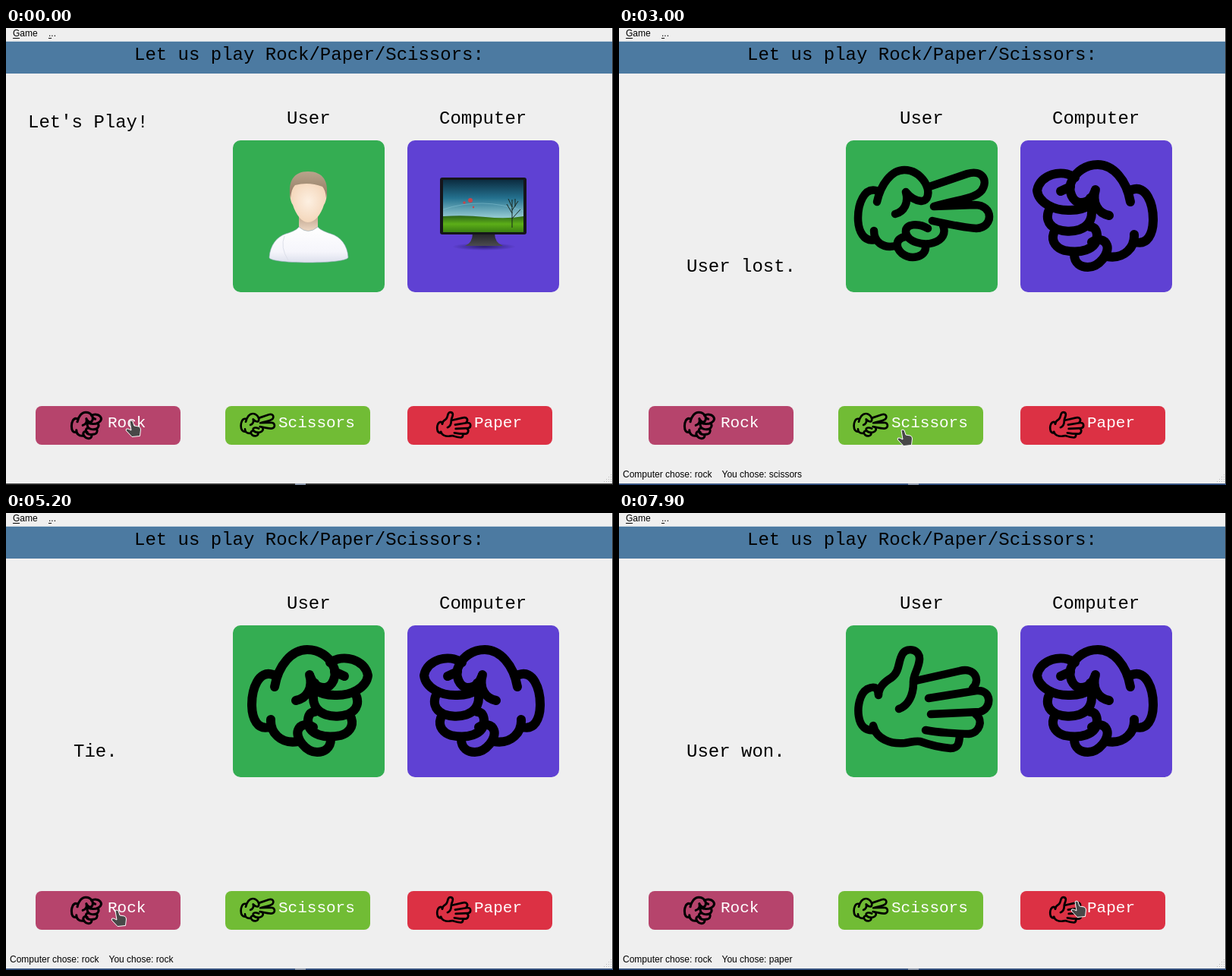
An HTML page that plays this animation: 800x602 px, repeating every 8000 ms.

```html
<!DOCTYPE html>
<html lang="en">
<head>
<meta charset="utf-8">
<title>Rock Paper Scissors</title>
<style>
  html, body { margin: 0; width: 100%; height: 100%; overflow: hidden; background: #efefef; }
  svg { display: block; width: 800px; height: 602px; }
  text { white-space: pre; }
  .mono { font: 24px "Liberation Mono", monospace; }
  .label { font-size: 21px; fill: #fff; }
  .ui { font: 12px "Liberation Sans", sans-serif; }
  .hand { fill: none; stroke: #000; stroke-width: 10.5; stroke-linecap: round; stroke-linejoin: round; }
  #rock { stroke-width: 12; }
</style>
</head>
<body>
<svg viewBox="0 0 800 602">
  <defs>
    <g id="rock" class="hand">
      <path d="M55 81C60 52 78 32 98 32C115 32 126 42 131 51C140 66 130 83 120 82C108 82 104 73 101 65C106 82 98 96 83 99"/>
      <path d="M53 65C34 58 25 84 25 104C25 124 33 138 48 134M50 124C49 140 62 157 86 153"/>
      <path d="M128 49C146 37 174 45 178 66C176 82 156 93 134 92C120 92 112 88 106 84M134 61L147 67M108 76L112 86"/>
      <path d="M160 88C168 100 164 112 152 117C136 123 104 121 106 92"/>
      <path d="M156 122C160 134 152 142 142 145C124 149 98 146 99 124C100 117 103 114 108 114"/>
      <path d="M129 150C129 162 120 167 111 167C96 167 82 148 86 138C89 130 98 129 106 134"/>
    </g>
    <g id="scissors" class="hand">
      <path d="M41 81C46 58 60 39 77 39C90 39 98 46 104 55C112 68 108 81 99 80C90 79 83 73 79 68C83 82 77 94 65 97"/>
      <path d="M40 66C24 62 16 84 16 102C16 120 24 134 38 131M37 119C37 133 48 143 66 139"/>
      <path d="M110 61L160 44C180 38 188 53 179 66C170 77 150 77 116 87L170 85C195 85 195 115 172 116C156 115 132 110 114 106"/>
      <path d="M108 116C96 109 78 109 79 121C81 134 102 139 115 135C128 131 132 122 128 112"/>
      <path d="M78 127C64 130 66 142 74 149C86 158 106 154 105 140"/>
    </g>
    <g id="paper" class="hand">
      <path d="M43 92C42 80 36 80 28 84C18 90 15 108 17 120C19 134 27 139 37 138"/>
      <path d="M36 132C40 150 60 157 78 155C90 153 92 152 98 153C112 158 126 161 138 162C150 162 149 152 150 146"/>
      <path d="M43 91C44 80 52 74 60 69C72 60 68 48 75 37C82 28 98 32 97 45C96 58 88 66 89 76C89 92 82 106 70 110"/>
      <path d="M92 73L150 60C170 55 178 72 167 83M109 96L172 86C193 84 193 110 176 114L112 117"/>
      <path d="M171 117C182 125 176 142 162 143C150 143 120 141 105 138"/>
    </g>

    <g id="person">
      <path fill="url(#neck)" d="M87 96H112V121H87Z"/>
      <path fill="url(#shirt)" stroke="#8fa9b8" stroke-width=".6" d="M48 154C49 138 58 127 70 123C80 120 85 117 87 114Q99 125 112 114C114 117 120 120 129 123C142 127 151 138 152 154C152 158 130 161 100 161C68 161 47 158 48 154Z"/>
      <path fill="none" stroke="#dcdfe9" d="M68 126Q62 141 73 158"/>
      <path fill="url(#skin)" d="M77 60C74 66 75 80 79 85C83 98 91 108 99 108C108 108 116 98 120 85C124 80 125 66 122 60Q100 46 77 60Z"/>
      <path fill="url(#hair)" d="M76 76C72 54 80 41 99 41C119 41 127 54 123 76Q122 65 118 61Q100 54 82 59Q77 64 76 76Z"/>
    </g>

    <g id="monitor">
      <ellipse cx="101" cy="140" rx="42" ry="5" fill="url(#shadow)"/>
      <path fill="url(#stand)" d="M86 122H115Q115 135 126 139H76Q86 135 86 122Z"/>
      <rect x="43" y="49" width="114" height="75" rx="3" fill="#15151a"/>
      <rect x="47" y="52" width="106" height="69" fill="url(#sky)"/>
      <path fill="none" stroke="#8cc8d5" stroke-opacity=".5" d="M47 91Q98 74 153 93"/>
      <path fill="url(#grass)" d="M47 100Q75 98 103 101T153 100V121H47Z"/>
      <path fill="none" stroke="#17251c" d="M138 115V78M138 96L131 84M138 92L146 80M138 103L149 91M138 88L133 77M142 87V77"/>
      <g fill="#c9454a"><circle cx="75" cy="82" r="1.8"/><circle cx="83" cy="79" r="3"/><circle cx="87" cy="88" r="1.2"/></g>
    </g>

    <linearGradient id="shirt" x2="0" y2="1"><stop stop-color="#fff"/><stop offset=".7" stop-color="#f5f5fb"/><stop offset="1" stop-color="#dcdfec"/></linearGradient>
    <linearGradient id="neck" x2="0" y2="1"><stop stop-color="#b99d86"/><stop offset="1" stop-color="#f1dcc8"/></linearGradient>
    <radialGradient id="skin"><stop stop-color="#fdf0e2"/><stop offset="1" stop-color="#f4d7bb"/></radialGradient>
    <linearGradient id="hair" x2="0" y2="1"><stop stop-color="#b9a48c"/><stop offset="1" stop-color="#8f7860"/></linearGradient>
    <linearGradient id="sky" x2="0" y2="1"><stop stop-color="#0c2c40"/><stop offset=".35" stop-color="#24718f"/><stop offset=".7" stop-color="#8fc6cf"/></linearGradient>
    <linearGradient id="grass" x2="0" y2="1"><stop stop-color="#2c641a"/><stop offset=".5" stop-color="#5cae18"/><stop offset="1" stop-color="#3a7d12"/></linearGradient>
    <linearGradient id="stand" x2="0" y2="1"><stop stop-color="#222226"/><stop offset="1" stop-color="#4b4b50"/></linearGradient>
    <radialGradient id="shadow"><stop stop-color="#2b1d70"/><stop offset="1" stop-color="#5f41d3"/></radialGradient>
  </defs>

  <rect width="800" height="602" fill="#efefef"/>
  <g class="ui">
    <text x="9" y="11">Game</text>
    <text x="56" y="11">...</text>
    <path stroke="#000" d="M9 13.5h9M56 13.5h4"/>
  </g>
  <rect y="17" width="800" height="1" fill="#d3dde5"/>
  <rect y="18" width="800" height="42" fill="#4c7aa1"/>

  <g class="mono">
    <text x="169" y="42">Let us play Rock/Paper/Scissors:</text>
    <text x="370" y="126">User</text>
    <text x="571" y="126">Computer</text>
    <text id="result"></text>
  </g>

  <rect x="299" y="148" width="200" height="200" rx="10" fill="#34ad52"/>
  <rect x="529" y="148" width="200" height="200" rx="10" fill="#5f41d3"/>
  <use id="user"/>
  <use id="computer"/>

  <g id="buttons"></g>
  <text id="status" class="ui" x="5" y="592"></text>

  <path stroke="#bbb" stroke-dasharray="1 2" d="M797 588.5h2M794 591.5h5M791 594.5h8M788 597.5h11"/>
  <path stroke="#333" d="M799.5 0V602"/>
  <rect id="edge" y="600" width="800" height="2"/>
  <rect x="381" y="600" width="14" height="2" fill="#8894a8"/>
  <path id="cursor" fill="#484848" stroke="#fff" stroke-linejoin="round"
    d="M6 2Q8 0 10 2L12 8L18 9Q20.500 10 20.500 13L19.500 21.500L9 22.500L1 14Q1 11 4 12L8 14Z"/>
</svg>

<script>
const LOOP = 8000;
const byId = id => document.getElementById(id);

// [name, button x, colour, icon x, label x]
const buttons = [
  ['Rock', 39, '#b6446c', 80, 134],
  ['Scissors', 289, '#71bc35', 305.5, 359],
  ['Paper', 529, '#dc3144', 564, 617],
];
byId('buttons').innerHTML = buttons.map(([name, x, color, iconX, textX]) => `
  <rect x="${x}" y="498" width="191" height="51" rx="8" fill="${color}"/>
  <use href="#${name.toLowerCase()}" transform="translate(${iconX} 498) scale(.256)"/>
  <text class="mono label" x="${textX}" y="526">${name}</text>`).join('');

// [time, user choice, computer choice]
const rounds = [
  [500, 'rock', 'scissors'],
  [3000, 'scissors', 'rock'],
  [3500, 'scissors', 'paper'],
  [3900, 'scissors', 'scissors'],
  [4400, 'rock', 'scissors'],
  [4800, 'rock', 'paper'],
  [5200, 'rock', 'rock'],
  [5600, 'rock', 'scissors'],
  [6300, 'scissors', 'scissors'],
  [7100, 'paper', 'paper'],
  [7900, 'paper', 'rock'],
];
const beats = { rock: 'scissors', scissors: 'paper', paper: 'rock' };

// [time, number of 100 ms steps, x, y]
const moves = [
  [0, 1, 157, 516],
  [2800, 1, 366, 528],
  [3500, 1, 360, 528],
  [4000, 3, 138, 522],
  [5800, 3, 371, 529],
  [6600, 4, 595, 510],
];

function outcome(user, computer) {
  if (user === computer) return 'Tie.';
  return beats[user] === computer ? 'User won.' : 'User lost.';
}

function cursorAt(t) {
  let x = 0, y = 0;
  for (const [start, steps, toX, toY] of moves) {
    if (t < start) break;
    const part = Math.min(1, (Math.floor((t - start) / 100) + 1) / steps);
    x += (toX - x) * part;
    y += (toY - y) * part;
  }
  return [x, y];
}

function setText(node, x, y, text) {
  node.setAttribute('x', x);
  node.setAttribute('y', y);
  node.textContent = text;
}

function show(id, art, transform) {
  byId(id).setAttribute('href', '#' + art);
  byId(id).setAttribute('transform', transform);
}

function draw(t) {
  const round = rounds.findLast(([start]) => t >= start);
  if (round) {
    const [, user, computer] = round;
    show('user', user, 'translate(299 148)');
    show('computer', computer, 'translate(729 148) scale(-1 1)');
    setText(byId('result'), 89, 321, outcome(user, computer));
    byId('status').textContent = `Computer chose: ${computer}    You chose: ${user}`;
  } else {
    show('user', 'person', 'translate(299 148)');
    show('computer', 'monitor', 'translate(529 148)');
    setText(byId('result'), 29, 131, "Let's Play!");
    byId('status').textContent = '';
  }
  byId('edge').setAttribute('fill', t < 300 ? '#2d2d2d' : '#35517f');
  byId('cursor').setAttribute('transform', `translate(${cursorAt(t)})`);
}

function tick() {
  draw(performance.now() % LOOP);
  requestAnimationFrame(tick);
}
tick();
</script>
</body>
</html>
```
